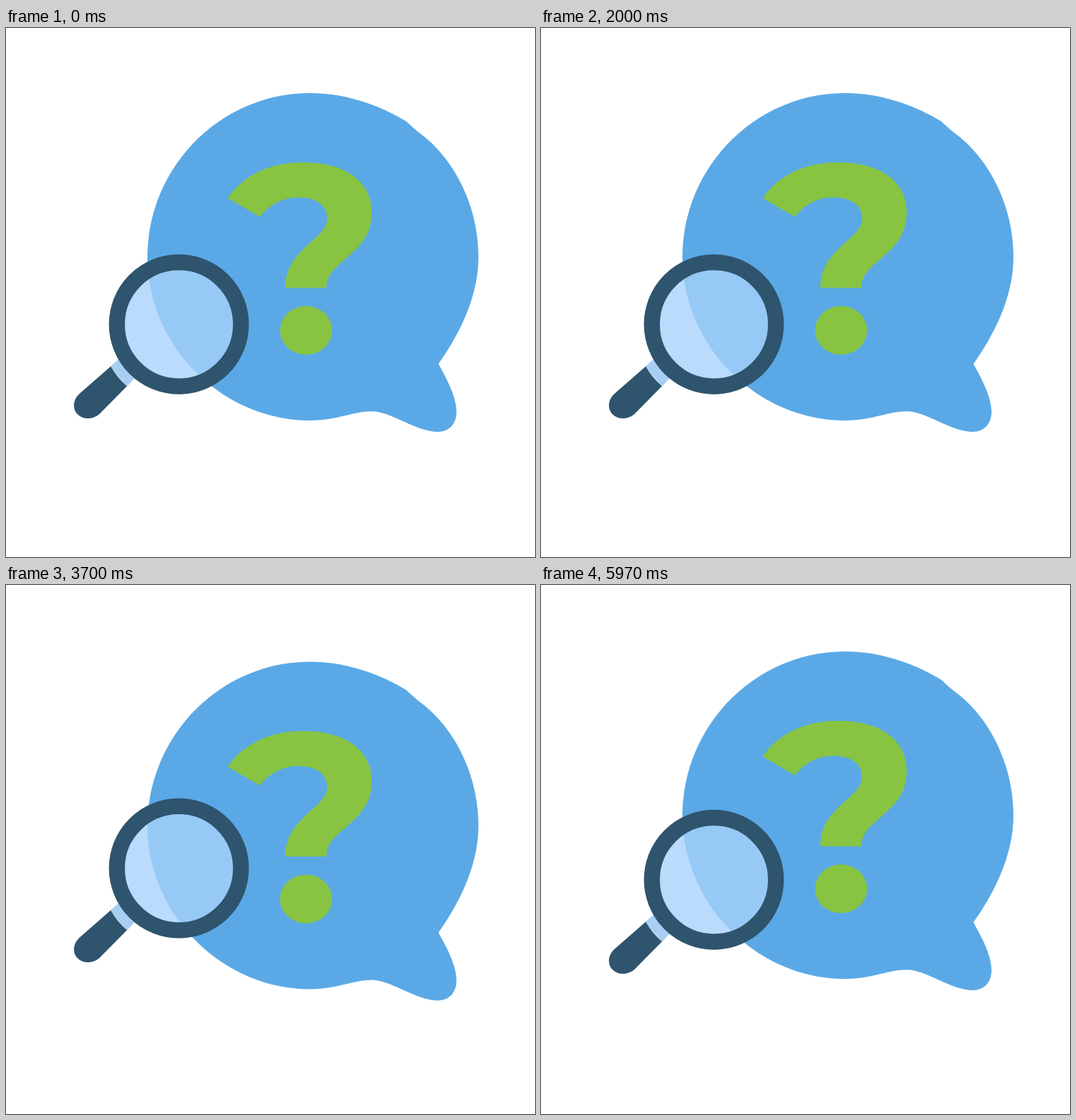
Animation, 748 px wide and 748 px high, one loop 6000 ms. Source, as an HTML page:

```html
<!DOCTYPE html>
<html lang="en">
<head>
<meta charset="utf-8">
<title>Question and magnifier</title>
<style>
  html, body { margin: 0; width: 100%; height: 100%; overflow: hidden; background: #fff; }
  svg { display: block; width: 100%; height: 100%; }
</style>
</head>
<body>
<svg viewBox="0 0 748 748">
  <g id="bubble">
    <path fill="#5aa9e6" d="M430 92C478 92 524 107 566 132C571 137 580 145 592 154C638 192 668 256 668 324
      C668 384 637 439 611.500 475C619 489 637 519 637 543C637 560 626 571 611 571
      C579 571 545 542 517 542C492 542 467 555 430 555C305 555 200 449 200 324C200 197 303 92 430 92Z"/>
    <g fill="#88c441">
      <path d="M313.500 240.500C336 208 373 190 420 190C479 190 517 216 517 261C517 290 503 307 485 322
        C467 338 453 348 453 367.500H395C395 339 409 324 424 309C440 294 454 285 454 269
        C454 251 439 239.500 413 239.500C391 239.500 372 250 359 267Z"/>
      <ellipse cx="424.300" cy="427.500" rx="36.800" ry="34.500"/>
    </g>
  </g>
  <g id="lens">
    <path fill="#a9cef4" d="M147 479L163 465L186 491L171 507Z"/>
    <path fill="#2f546d" d="M148 478.500L104 517C94 526 94 539 101 546C109 554 122 554 132 546L171 506.500Q157 494 148 478.500Z"/>
    <circle cx="244.500" cy="419" r="77" fill="#a8d2fc" fill-opacity=".79"/>
    <circle cx="244.500" cy="419" r="87.700" fill="none" stroke="#2f546d" stroke-width="22.500"/>
  </g>
</svg>
<script>
  const LOOP = 6000, FPS = 30;
  const bubble = document.getElementById('bubble');
  const lens = document.getElementById('lens');
  const shiftY = (el, y) => el.setAttribute('transform', `translate(0 ${y.toFixed(2)})`);

  // Both parts drift towards each other and back once per second.
  function draw(now) {
    const step = Math.floor((now % LOOP) * FPS / 1000 + 0.15) % FPS;
    const fromRest = Math.min(step, FPS - step) / FPS;
    const drift = 25 * Math.sin(2.4 * fromRest);
    shiftY(bubble, drift);
    shiftY(lens, -1.12 * drift);
  }

  const start = performance.now();
  function tick() {
    draw(performance.now() - start);
    requestAnimationFrame(tick);
  }
  tick();
</script>
</body>
</html>
```
